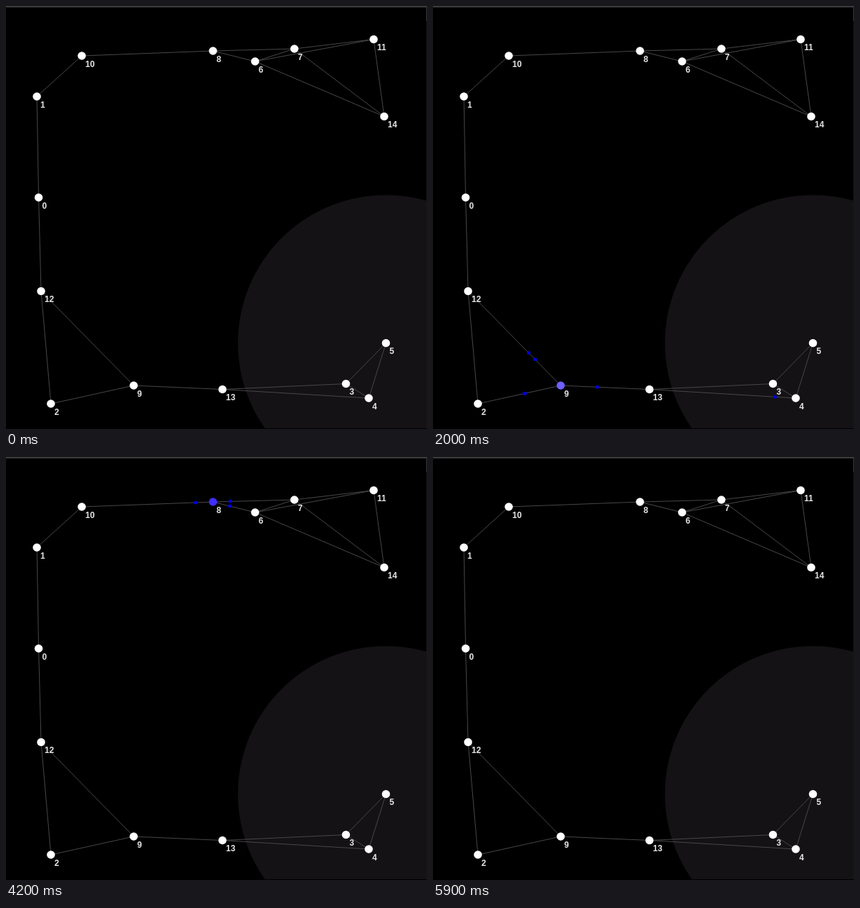
Recreate the animation shown at these times as an HTML page with a canvas. Size 600 by 603 pixels, loop 6 s.

```html
<!DOCTYPE html>
<html lang="en">
<head>
<meta charset="utf-8">
<title>Network flood</title>
<style>
  html, body { margin: 0; width: 100%; height: 100%; overflow: hidden; background: #000; }
  canvas { display: block; }
</style>
</head>
<body>
<canvas id="stage" width="600" height="603"></canvas>
<script>
const ctx = document.getElementById('stage').getContext('2d');
const LOOP = 6000, STEP = 100, START = 700, SPEED = 0.3285;
const FADE = 138, RING_MAX = 110, RANGE = 211;

// x, y and the distance the wave has covered when the node lights up
const nodes = [
  [46.5, 273, 704], [44, 129, 850], [64, 567, 495], [484.5, 538.5, 80],
  [517, 559, 80], [541.5, 480.5, 0], [355, 79, 1187], [411, 61, 1241],
  [295, 64, 1125], [182, 541, 375], [108, 71, 937], [524, 47.5, 1357],
  [50, 406.5, 568], [308.5, 546.5, 248], [539, 157.5, 1384]
].map(([x, y, lit]) => ({ x, y, lit }));

const edges = [
  [10, 1], [1, 0], [0, 12], [12, 2], [12, 9], [2, 9], [9, 13],
  [13, 3], [13, 4], [3, 5], [4, 5], [3, 4], [10, 8], [8, 7],
  [8, 6], [6, 7], [6, 11], [7, 11], [7, 14], [6, 14], [11, 14]
];

// Repeated sends: from, to, distance at departure
const repeats = [
  [3, 13, 73], [4, 13, 55], [9, 12, 362], [9, 2, 374],
  [1, 10, 835], [12, 2, 837], [12, 9, 825], [8, 10, 1355]
];
const packets = edges.flatMap(([a, b]) => [
  [a, b, nodes[a].lit], [b, a, nodes[b].lit]
]).concat(repeats);

function disc(x, y, r, color) {
  ctx.fillStyle = color;
  ctx.beginPath();
  ctx.arc(x, y, r, 0, 2 * Math.PI);
  ctx.fill();
}

function nodeColor(age) {
  if (age < 0 || age >= FADE) return '#fff';
  const k = age / FADE;
  return `rgb(${24 + 231 * k}, ${255 * k}, 255)`;
}

function drawRing({ x, y, lit }, wave) {
  const r = wave - lit;
  if (r <= 0 || r >= RING_MAX) return;
  ctx.strokeStyle = `rgba(0, 0, 225, ${1 - r / RING_MAX})`;
  ctx.lineWidth = 2;
  ctx.beginPath();
  ctx.arc(x, y, r, 0, 2 * Math.PI);
  ctx.stroke();
}

function drawPacket([from, to, departure], wave) {
  const a = nodes[from], b = nodes[to];
  const k = (wave - departure) / Math.hypot(b.x - a.x, b.y - a.y);
  if (k > 0 && k < 1) disc(a.x + (b.x - a.x) * k, a.y + (b.y - a.y) * k, 2.5, '#0000e0');
}

function draw(time) {
  const wave = (time - START) * SPEED;
  ctx.fillStyle = '#000';
  ctx.fillRect(0, 0, 600, 603);
  disc(nodes[5].x, nodes[5].y, RANGE, '#141214');

  ctx.strokeStyle = '#484848';
  ctx.lineWidth = 1;
  ctx.beginPath();
  for (const [a, b] of edges) {
    ctx.moveTo(nodes[a].x, nodes[a].y);
    ctx.lineTo(nodes[b].x, nodes[b].y);
  }
  ctx.stroke();

  for (const i of [5, 3, 4]) drawRing(nodes[i], wave);
  for (const n of nodes) disc(n.x, n.y, 5.8, nodeColor(wave - n.lit));
  for (const p of packets) drawPacket(p, wave);

  ctx.font = 'bold 12px "Liberation Sans", Arial, sans-serif';
  ctx.fillStyle = '#e4e4e4';
  nodes.forEach((n, i) => ctx.fillText(i, n.x + 5, n.y + 15.5));

  ctx.fillStyle = '#1c1616';
  ctx.fillRect(599, 0, 1, 603);
  ctx.fillStyle = '#3c3c3c';
  ctx.fillRect(0, 0, 600, 2);
  ctx.fillRect(599, 0, 1, 21);
  ctx.fillStyle = '#000';
  ctx.fillRect(0, 602, 600, 1);
}

const origin = performance.now();
function tick() {
  const time = (performance.now() - origin) % LOOP;
  draw(Math.floor(time / STEP) * STEP);
  requestAnimationFrame(tick);
}
tick();
</script>
</body>
</html>
```
